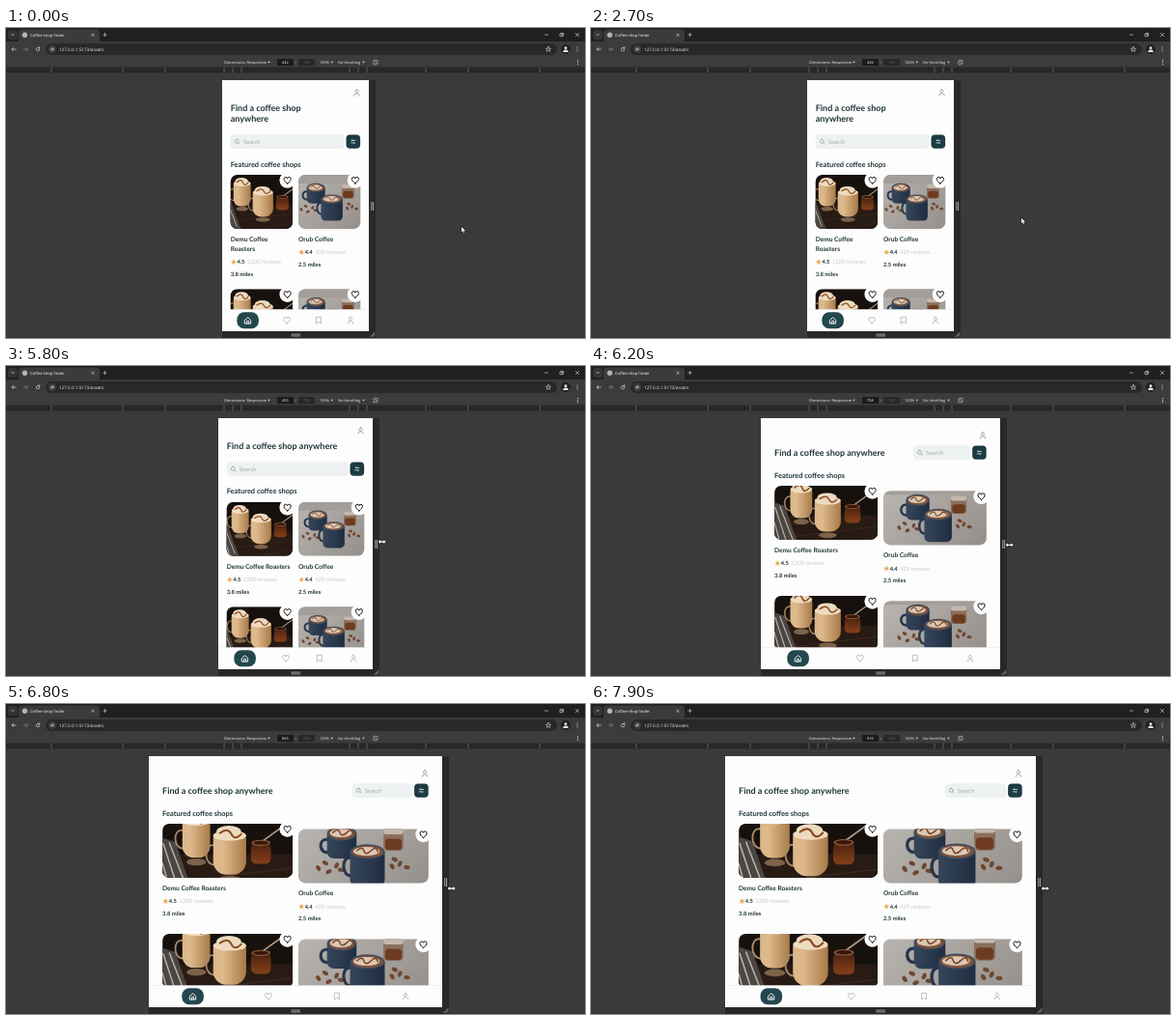
An HTML page with a canvas for the animation above (8 s loop, 600x321 px).

```html
<!DOCTYPE html>
<html lang="en">
<head>
<meta charset="utf-8">
<title>Coffee-shop finder</title>
<style>
  html, body { margin: 0; width: 100%; height: 100%; overflow: hidden; background: #3a3a3a; }
  canvas { display: block; width: 600px; height: 321px; }
</style>
</head>
<body>
<canvas></canvas>
<script>
const LOOP = 8000, STEP = 100;
const PX = 0.3515;              // stage pixels per CSS pixel of the previewed page
const TOP = 54, NAV = 291.5, BOTTOM = 314;
const INK = '#20353a', TEAL = '#23474e', MUTED = '#a4abae';
const PAGE_FONT = 'Lato, sans-serif', UI_FONT = '"Open Sans", sans-serif';

const canvas = document.querySelector('canvas');
const dpr = window.devicePixelRatio || 1;
canvas.width = 600 * dpr;
canvas.height = 321 * dpr;
const c = canvas.getContext('2d');
c.textRendering = 'geometricPrecision';

// Icons live in a 24-unit box
const ICONS = {
  heart: 'M12 21.5C5 16 2 12 2 8.5a5 5 0 0 1 10-2a5 5 0 0 1 10 2c0 3.5-3 7.5-10 13z',
  user: 'M4 22v-2a6 5 0 0 1 6-5h4a6 5 0 0 1 6 5v2M12 2a5 5 0 1 0 .01 0z',
  home: 'M3 11L12 3l9 8v11H3zM9 22v-8h6v8',
  bookmark: 'M5 2h14v20l-7-6-7 6z',
  search: 'M10 2a8 8 0 1 0 .01 0zM16 16l6 6',
  star: 'M12 1l3 8h8l-6.5 5 2.5 8-7-5-7 5 2.5-8L1 9h8z',
  swap: 'M21 7H4l4-4M3 17h17l-4 4',
  back: 'M22 12H3l8-8M3 12l8 8',
  forward: 'M2 12h19l-8-8M21 12l-8 8',
  reload: 'M20 12a8 8 0 1 1-3-6M20 1v6h-6',
  close: 'M4 4L20 20M20 4L4 20',
  plus: 'M12 2v20M2 12h20',
  minus: 'M3 12h18',
  square: 'M4 8h12v12H4zM8 8V4h12v12h-4',
  chevron: 'M4 8l8 8 8-8',
  info: 'M3 8h10M17 8h4M3 16h4M11 16h10M15 5v6M9 13v6',
  rotate: 'M3 16L16 3l5 5L8 21zM3 9a8 8 0 0 1 6-6M21 15a8 8 0 0 1-6 6',
  caret: 'M2 6h20L12 19z',
  arrow: 'M0 0v21l5-5 4 8 4-2-4-7h7z',
  resize: 'M0 12l7-6v4h10V6l7 6-7 6v-4H7v4z'
};
for (const key in ICONS) ICONS[key] = new Path2D(ICONS[key]);

function icon(name, x, y, size, stroke, line = 0.7, fill) {
  const k = size / 24;
  c.save();
  c.translate(x - size / 2, y - size / 2);
  c.scale(k, k);
  if (stroke) {
    c.strokeStyle = stroke;
    c.lineWidth = line / k;
    c.lineJoin = c.lineCap = 'round';
    c.stroke(ICONS[name]);
  }
  if (fill) {
    c.fillStyle = fill;
    c.fill(ICONS[name]);
  }
  c.restore();
}

function rect(x, y, w, h, color, r = 0) {
  c.fillStyle = color;
  c.beginPath();
  c.roundRect(x, y, w, h, r);
  c.fill();
}

function oval(x, y, rx, ry, color, turn = 0) {
  c.fillStyle = color;
  c.beginPath();
  c.ellipse(x, y, rx, ry, turn, 0, 7);
  c.fill();
}

function curve(color, width, path) {
  c.strokeStyle = color;
  c.lineWidth = width;
  c.lineCap = 'round';
  c.stroke(new Path2D(path));
}

function text(str, x, y, size, color, weight = 400, family = PAGE_FONT) {
  c.font = `${weight} ${size}px ${family}`;
  c.fillStyle = color;
  c.fillText(str, x, y);
}
const ui = (str, x, y, size, color) => text(str, x, y, size, color, 400, UI_FONT);

function dots(x, y) {
  for (const d of [-2, 0, 2]) oval(x, y + d, 0.6, 0.6, '#d0d0d0');
}

function blend(from, to, x0, y0, x1, y1) {
  const g = c.createLinearGradient(x0, y0, x1, y1);
  g.addColorStop(0, from);
  g.addColorStop(1, to);
  return g;
}

// Linear interpolation through [time, value] pairs
function at(keys, t) {
  const i = keys.findIndex(k => k[0] > t);
  if (i < 0) return keys[keys.length - 1][1];
  const [t0, a] = keys[i - 1], [t1, b] = keys[i];
  return a + (b - a) * (t - t0) / (t1 - t0);
}

const WIDTH = [[0, 432], [5500, 432], [5700, 441], [5800, 455], [5900, 515], [6000, 590], [6100, 655],
  [6200, 708], [6300, 751], [6400, 779], [6600, 828], [6800, 865], [7200, 899], [7600, 911], [7900, 916]];
const MOUSE_X = [[0, 472], [900, 451.5], [1800, 447], [2700, 446], [3600, 429], [4500, 387], [5000, 386]];
const MOUSE_Y = [[0, 206], [900, 200], [1800, 197.5], [2700, 197], [3600, 192], [4500, 181], [5000, 180],
  [5500, 180.5], [5800, 182], [6400, 187], [6800, 191]];

// Photos are drawn in a 150 x 100 space centred on the origin
function cup(x, y, w, h) {
  curve('#a58a68', 2, `M${x - w} ${y - h * .25}c-11 -2 -11 ${h * .5} 1 ${h * .5}`);
  oval(x, y + h * .62, w * .7, 4, '#7d624a');
  rect(x - w, y - h * .5, w * 2, h, blend('#dcb88a', '#a87a48', x - w * .4, 0, x + w, 0), [3, 3, w * .8, w * .8]);
  oval(x, y - h * .5, w, h * .13, '#efdcc0');
  oval(x - 1, y - h * .6, w * .75, h * .15, '#ecdabf');
  curve('#8a4a20', 2.2, `M${x - w * .6} ${y - h * .56}q${w * .5} -7 ${w * .7} 1t${w * .6} 0`);
}

function lattePhoto() {
  rect(-75, -50, 150, 100, '#17110e');
  rect(-75, 4, 150, 46, '#281b14');
  curve('#3d2a1e', 1.2, 'M-75 38L75 20M0 50L75 36');
  c.fillStyle = '#4b4642';
  c.fill(new Path2D('M-75 -15L-60 -10-48 25-38 50H-75z'));
  curve('#b9b4ac', 1.6, 'M-74 -8L-55 50M-67 -9L-46 45M-75 14L-65 50');
  cup(-36, -13, 16, 42);
  curve('#b09c85', 1.8, 'M39 -10L75 -36');
  rect(27, -9, 23, 24, blend('#4c2010', '#7e3d18', 0, -9, 0, 12), 6);
  oval(38.5, -9, 11, 3.5, '#8d5c38');
  oval(38.5, -9, 9, 2.3, '#35180d');
  cup(2.5, 5, 19, 45);
}

function mug(x, y, w, h) {
  curve('#26364b', 3.5, `M${x - w} ${y + 7}c-11 -1 -9 ${h * .6} 2 ${h * .5}`);
  rect(x - w, y, w * 2, h, blend('#35465c', '#202d40', x - w, 0, x + w, 0), [0, 0, 8, 8]);
  oval(x, y, w, 8.5, '#3b4c61');
  oval(x, y, w - 2, 7, '#80543a');
  oval(x - 1, y - .5, w * .75, 5, '#dac8b5');
  curve('#7a4324', 1.6, `M${x - w * .6} ${y - 1}q6 -6 8 0t8 0t8 1`);
}

function mugPhoto() {
  rect(-75, -50, 150, 100, blend('#b8b4b0', '#96918c', -60, -50, 50, 50));
  rect(-75, -50, 150, 16, '#a39e99');
  mug(-25, -26, 17, 29);
  rect(23, -32, 23, 26, '#8a6f5c', 5);
  rect(23, -32, 23, 7, '#c4b8ac', 3);
  rect(25, -20, 19, 13, '#6f3b20', 4);
  for (const [x, y, turn] of [[-44, 8, .5], [-31, 11, 2], [-52, 14, 1], [-26, 16, .2], [-40, 18, 2.6],
    [36, 4, .4], [42, 9, 2], [33, 12, 1], [50, 13, .1]])
    oval(x, y, 3.6, 2.3, '#70462d', turn);
  mug(4.5, -5, 20, 40);
}

const SHOPS = [
  { name: ['Demu Coffee', 'Roasters'], score: '4.5', reviews: '1200 reviews', miles: '3.8 miles', photo: lattePhoto },
  { name: ['Orub Coffee'], score: '4.4', reviews: '429 reviews', miles: '2.5 miles', photo: mugPhoto }
];

function card(shop, x, y, w, wrap) {
  const h = 56, k = Math.max(w / 150, h / 100);
  c.save();
  c.beginPath();
  c.roundRect(x, y, w, h, 7);
  c.clip();
  c.translate(x + w / 2, y + h / 2);
  c.scale(k, k);
  shop.photo();
  c.restore();

  oval(x + w - 5.4, y + 5.6, 8.2, 8.2, '#fdfdfd');
  icon('heart', x + w - 5.4, y + 5.8, 8.4, '#111', 1);

  let base = y + h + 12.8;
  const lines = wrap ? shop.name : [shop.name.join(' ')];
  lines.forEach((line, i) => text(line, x, base + i * 10, 6.6, INK, 700));
  base += (lines.length - 1) * 10;
  icon('star', x + 3.2, base + 11.4, 6.8, null, 0, '#eca94f');
  text(shop.score, x + 6.7, base + 13.4, 5.7, INK, 700);
  text(shop.reviews, x + 17.2, base + 13.4, 5.9, '#c5cacc');
  text(shop.miles, x, base + 25.9, 5.9, INK, 700);
}

function page(css) {
  const L = Math.round(300 - css * PX / 2), R = 600 - L, W = R - L;
  const wide = css >= 640, wrap = css < 450;
  const pad = wide ? 14.1 : 8.7, x0 = L + pad, x1 = R - pad;

  c.save();
  c.beginPath();
  c.rect(L, TOP, W, BOTTOM - TOP);
  c.clip();
  rect(L, TOP, W, BOTTOM - TOP, '#fdfdfd');

  icon('user', R - (wide ? 18 : 12.5), wide ? 72 : 67, 7.8, '#858c90', 0.75);

  const title = wrap ? ['Find a coffee shop', 'anywhere'] : ['Find a coffee shop anywhere'];
  title.forEach((line, i) => text(line, x0, (wide ? 92.6 : 85.6) + i * 11.2, 9, INK, 700));

  const searchY = wide ? 82.3 : wrap ? 110.3 : 99.2;
  const searchX = wide ? x1 - 16.8 - (60.5 + (W - 273) * .06) : x0;
  rect(searchX, searchY, x1 - 16.8 - searchX, 14.8, '#eef1f1', 4);
  icon('search', searchX + 7, searchY + 7.5, 6, '#89969a', 0.7);
  text('Search', searchX + 13, searchY + 9.6, 6, MUTED);
  rect(x1 - 14.8, searchY + .2, 14.6, 14.3, '#1c3b43', 4);
  icon('swap', x1 - 7.5, searchY + 7.4, 5.6, '#fff', 0.7);

  const heading = wide ? 115.5 : wrap ? 143.6 : 132.4;
  text('Featured coffee shops', x0, heading, 7.45, INK, 700);

  const cardW = 297 - x0, pitch = wide ? 114 : wrap ? 118.2 : 108.4;
  for (let row = 0; row < 2; row++) {
    const y = heading + 8.4 + row * pitch;
    card(SHOPS[0], x0, y, cardW, wrap);
    card(SHOPS[1], 303, y + (wide ? 5.5 : 0), cardW, wrap);
  }

  rect(L, NAV, W, BOTTOM - NAV, '#fdfdfd');
  rect(L, NAV, W, 0.5, '#e6e8e8');
  ['home', 'heart', 'bookmark', 'user'].forEach((name, i) => {
    const x = L + (2 * i + 1) * W / 8 + [7.6, 10, 5, 0][i];
    if (!i) rect(x - 11.3, 294.2, 22.6, 17, TEAL, 7.5);
    icon(name, x, 302.7, 8, i ? '#a6adb0' : '#fff', i ? 0.75 : 0.9);
  });
  c.restore();
  return { L, R };
}

function frameHandles({ L, R }, hover) {
  rect(R, TOP, 7, BOTTOM - TOP, '#282828');
  rect(L, BOTTOM, R - L + 7, 7, '#282828');
  const grip = hover ? '#8f9a9d' : '#9a9a9a';
  rect(R + 2.2, 180, 1.1, 9, grip);
  rect(R + 4, 180, 1.1, 9, grip);
  rect(295.5, 316.6, 9.5, 1, '#9a9a9a');
  rect(295.5, 318.4, 9.5, 1, '#9a9a9a');
  curve('#b0b0b0', 0.8, `M${R + 2} 319.5l4 -4M${R + 4} 319.5l2 -2`);
}

function browser(css) {
  rect(0, 0, 600, 14, '#1f2020');
  rect(2, 2, 10, 10, '#343535', 3);
  icon('chevron', 7, 7, 4, '#ddd', 0.7);
  rect(13, 1.5, 84, 14, '#3b3b3b', [4, 4, 0, 0]);
  oval(19.5, 7.2, 2.7, 2.7, '#b4b4b4');
  ui('Coffee-shop finder', 25, 8.8, 4.1, '#fff');
  icon('close', 90, 7.2, 3.6, '#ddd', 0.6);
  icon('plus', 102.5, 7, 4.2, '#ddd', 0.6);
  icon('minus', 560, 7, 4.5, '#ddd', 0.6);
  icon('square', 576, 7, 5, '#ddd', 0.6);
  icon('close', 592, 7, 5, '#ddd', 0.6);

  rect(0, 14, 600, 16, '#3b3b3b');
  icon('back', 8, 22, 5.2, '#d8d8d8');
  icon('forward', 20.5, 22, 5.2, '#888');
  icon('reload', 33, 22, 5.2, '#d8d8d8');
  rect(41, 16, 530, 12, '#282828', 6);
  oval(48, 22, 4.2, 4.2, '#3b3b3b');
  icon('info', 48, 22, 4.6, '#ddd', 0.5);
  ui('127.0.0.1:5173/assets', 55, 23.7, 4.6, '#f0f0f0');
  icon('star', 562, 22, 5.8, '#d0d0d0', 0.6);
  oval(580, 22, 5, 5, '#202020');
  oval(580, 20.7, 1.4, 1.4, '#e4e4e4');
  rect(577.3, 22.6, 5.4, 2.4, '#e4e4e4', [2, 2, 0, 0]);
  dots(592, 22);

  rect(0, 30, 600, 10.5, '#3c3c3c');
  ui('Dimensions: Responsive', 226, 37, 3.9, '#f0f0f0');
  rect(281, 32, 17, 7, '#1b1b1b', 1);
  ui(String(Math.round(css)), 286, 37, 3.9, '#fff');
  ui('×', 299.2, 37, 3.6, '#bbb');
  rect(303, 32, 17, 7, '#282828', 1);
  ui('739', 308, 37, 3.9, '#666');
  ui('100%', 325, 37, 3.9, '#f0f0f0');
  ui('No throttling', 344, 37, 3.9, '#f0f0f0');
  for (const x of [272.5, 337.7, 370.5]) icon('caret', x, 35.6, 3, null, 0, '#e0e0e0');
  icon('rotate', 383, 35.4, 6.5, '#ccc', 0.7);
  dots(592.5, 35.4);

  rect(0, 40.5, 600, 6, '#282828');
  for (const d of [56, 65, 74, 135, 179, 253])
    for (const x of [300 - d, 300 + d]) rect(x - 0.4, 40.5, 0.8, 6, '#6c6c6c');
}

function draw(now) {
  const t = Math.floor(now % LOOP / STEP) * STEP;
  const css = at(WIDTH, t);
  c.setTransform(dpr, 0, 0, dpr, 0, 0);
  rect(0, 0, 600, 321, '#3a3a3a');
  browser(css);
  const hover = t >= 4600;
  const edges = page(css);
  frameHandles(edges, hover);

  const x = t < 5500 ? at(MOUSE_X, t) : edges.R + 9.7;
  const y = at(MOUSE_Y, t);
  if (hover) icon('resize', x, y, 8, '#111', 0.8, '#fff');
  else icon('arrow', x + 3, y + 3, 6, '#111', 0.8, '#fff');
  requestAnimationFrame(draw);
}
requestAnimationFrame(draw);
</script>
</body>
</html>
```
